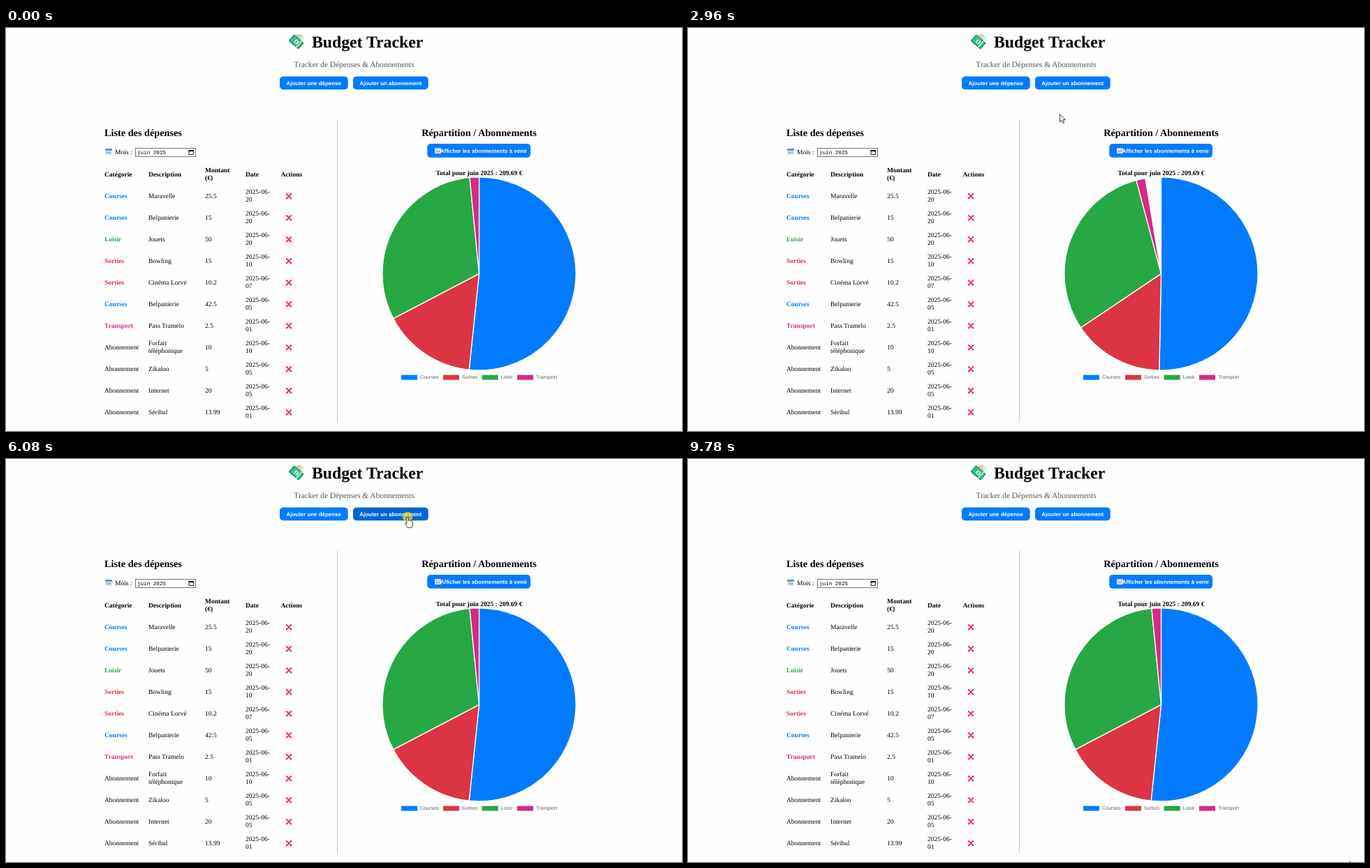
These frames come from a looping animation (968x578 px, 9.85 s). An HTML page:

```html
<!DOCTYPE html>
<html lang="fr">
<head>
<meta charset="utf-8">
<title>Budget Tracker</title>
<style>
  html, body { margin: 0; width: 100%; height: 100%; overflow: hidden; background: #fefefe; }
  svg { display: block; }
  text { font: 9.5px "Liberation Serif", "Times New Roman", serif; text-rendering: geometricPrecision; white-space: pre; }
  .bold { font-weight: bold; }
  .h1 { font-size: 23.75px; font-weight: bold; }
  .h2 { font-size: 14.25px; font-weight: bold; }
  .sub { font-size: 11.4px; fill: #555; }
  .mid { text-anchor: middle; }
  .btn { font: bold 7.92px "Liberation Sans", Arial, sans-serif; fill: #fff; }
  .legend { font: 7.13px "Liberation Sans", Arial, sans-serif; fill: #666; }
  .hint { font: 8.3px "Liberation Sans", Arial, sans-serif; fill: #757575; }
  .mono { font: 7.6px "Liberation Mono", monospace; }
  .date { font-size: 8.1px; }
  .box { fill: #fff; stroke: #ccc; stroke-width: .8; }
  .modal { filter: drop-shadow(0 3px 8px rgba(0, 0, 0, .35)); }
</style>
</head>
<body>
<svg id="stage" width="968" height="578" viewBox="0 0 968 578"></svg>
<script>
const LOOP = 9850;
const BLUE = '#007bff', RED = '#dc3545', GREEN = '#28a745', PINK = '#d62a85';
const HOVER = '#0066d6';

const text = (x, y, s, cls = '', fill = '') =>
  `<text x="${x}" y="${y}" class="${cls}"${fill && ` fill="${fill}"`}>${s.replace('&', '&amp;')}</text>`;
const rect = (x, y, w, h, attrs = '') =>
  `<rect x="${x}" y="${y}" width="${w}" height="${h}" ${attrs}/>`;
const group = (id, body, attrs = '') => `<g id="${id}" ${attrs}>${body}</g>`;

// Page buttons: [id, x, y, width, height, label, label centre]
const buttons = [
  ['expense', 392, 69.5, 97.7, 18.7, 'Ajouter une dépense', 440.7],
  ['subscribe', 497, 69.5, 107.7, 18.7, 'Ajouter un abonnement', 550.7],
  ['upcoming', 603.2, 166, 147.8, 19.8, 'Afficher les abonnements à venir', 684]
];
const button = ([id, x, y, w, h, label, cx]) =>
  rect(x, y, w, h, `id="${id}" rx="4.75" fill="${BLUE}"`) +
  text(cx, y + h / 2 + 2.8, label, 'btn mid');

const picker = (x, y) =>
  `<path d="M${x} ${y + 1}h6.4v6h-6.4z" fill="none" stroke="#111" stroke-width=".9"/>` +
  rect(x - .4, y + .4, 7.2, 2.2, 'fill="#111"');

const calendar = (x, y, w, top) =>
  rect(x, y, w, w * .9, 'rx="1" fill="#e4e9f0"') +
  rect(x, y, w, w * .28, `rx=".8" fill="${top}"`) +
  [0, 1, 2].map(i => rect(x + w * (.18 + i * .24), y + w * .42, w * .14, w * .3, 'fill="#8a9bb0"')).join('');

const banknote = `<g transform="translate(416 19.5)">
  <path d="M-3-9 5-11 10-7 7-1z" fill="#d9c9a3"/>
  <path d="M-11 1-6-5-1 1-6 6z" fill="#cfd8d2"/>
  <g transform="rotate(42)">
    <rect x="-9.5" y="-5.5" width="19" height="12" rx="1" fill="#149a67"/>
    <rect x="-8" y="-4.2" width="16" height="9.2" fill="#36c08a"/>
    <circle r="3.2" cy=".4" fill="#e6f6ee"/>
    <path d="M0-2V3" stroke="#149a67" stroke-width="1.2"/>
    <path d="M5-5.5v12" stroke="#d3efdf" stroke-width="1.6"/>
  </g>
  <path d="M4-9 11-5 10 0z" fill="#e9edf0"/>
</g>`;

// Expense rows: category, description, amount, day of June
const rows = [
  ['Courses', 'Maravelle', '25.5', '20'],
  ['Courses', 'Belpanierie', '15', '20'],
  ['Loisir', 'Jouets', '50', '20'],
  ['Sorties', 'Bowling', '15', '10'],
  ['Sorties', 'Cinéma Lorvé', '10.2', '07'],
  ['Courses', 'Belpanierie', '42.5', '05'],
  ['Transport', 'Pass Tramelo', '2.5', '01'],
  ['Abonnement', 'Forfait téléphonique', '10', '10'],
  ['Abonnement', 'Zikaloo', '5', '05'],
  ['Abonnement', 'Internet', '20', '05'],
  ['Abonnement', 'Séribul', '13.99', '01']
];
const tint = { Courses: BLUE, Sorties: RED, Loisir: GREEN, Transport: PINK };

const twoLines = (x, y, a, b, cls) => text(x, y - 5.6, a, cls) + text(x, y + 5.2, b, cls);

function row([cat, desc, amount, day], i) {
  const y = 243.7 + 31 * i;
  const [first, second] = desc.split(' ');
  return text(141, y, cat, tint[cat] ? 'bold' : '', tint[cat]) +
    (desc.length > 15 ? twoLines(204, y, first, second) : text(204, y, desc)) +
    text(285, y, amount) +
    twoLines(343, y, '2025-06-', day) +
    `<path d="M401.7 ${y - 5.8}l6.6 6.6m0-6.6l-6.6 6.6" stroke="#ea2a58" stroke-width="2" stroke-linecap="round"/>`;
}

const table =
  text(141, 213, 'Catégorie', 'bold') + text(204, 213, 'Description', 'bold') +
  twoLines(285, 213, 'Montant', '(€)', 'bold') +
  text(343, 213, 'Date', 'bold') + text(393.5, 213, 'Actions', 'bold') +
  rows.map(row).join('');

const slices = [['Courses', 83], ['Sorties', 25.2], ['Loisir', 50], ['Transport', 2.5]];
const legendX = [566, 626, 681.7, 732];
const legend = slices.map(([name], i) =>
  rect(legendX[i], 497.6, 23, 7, `fill="${tint[name]}"`) +
  text(legendX[i] + 27, 503.4, name, 'legend')).join('');

const chart =
  text(677.5, 211, 'Total pour juin 2025 : 209.69 €', 'bold mid') +
  group('pie', slices.map(([name]) => `<path fill="${tint[name]}"/>`).join(''),
    'stroke="#fff" stroke-width="1.3" stroke-linejoin="bevel"') + legend;

const upcoming = text(677.5, 214, 'Abonnements à venir', 'bold mid') +
  rows.slice(7).map(([, name, amount, day], i) => {
    const y = 228 + i * 83;
    return rect(524.5, y, 306, 76, 'rx="4" fill="#fafafa" stroke="#ddd" stroke-width=".8"') +
      text(677.5, y + 24, name, 'bold mid') + text(677.5, y + 42, amount + ' €', 'mid') +
      text(677.5, y + 60, '2025-07-' + day, 'mid');
  }).join('');

function modal(id, title, labels, hint) {
  const fields = labels.map((label, i) => {
    const y = 298.8 + 40.6 * i;
    return text(498.5, y - 4.8, label, 'mid') +
      rect(379.4, y, 249, i === 3 ? 21.2 : 19.6, 'rx="3" class="box"');
  }).join('');
  return group(id,
    rect(0, 0, 968, 578, 'fill="#000" opacity=".4"') +
    rect(362, 228, 273.5, 266.7, 'rx="7" fill="#fff" class="modal"') +
    text(624, 243.3, '×', 'mid') +
    text(498.5, 270.4, title, 'h2 mid') + fields +
    (hint ? text(384, 393, hint, 'hint') : '') +
    text(385, 434, 'jj/mm/aaaa', 'mono date') + picker(614.6, 426.8) +
    rect(474.8, 456.7, 47, 20.5, 'rx="4.75" fill="#ccc"') +
    text(498.3, 469.8, 'Ajouter', 'btn mid'));
}

const cursor = group('cursor',
  `<path id="arrow" d="M0 0V11L2.6 8.7 4.5 12.8 6.3 12 4.5 8H8z"/>
   <path id="hand" d="M-1.2 1Q0-.8 1.2 1V5.4L2.2 4.8 3.6 5.6 4.6 5.3 5.6 6.3 6.8 6.4 7.4 7.6V11Q7.2 13 5.8 15.4H-.2Q-1.4 12.6-3.6 10.2-4.2 8.6-2.6 8.6L-1.2 9.8z"/>`,
  'fill="#fff" stroke="#111" stroke-width=".8" stroke-linejoin="round"');

const $ = id => document.getElementById(id);

$('stage').innerHTML =
  rect(0, 0, 968, 578, 'fill="#fefefe"') + banknote +
  text(517.6, 28, 'Budget Tracker', 'h1 mid') +
  text(498.5, 55.5, 'Tracker de Dépenses & Abonnements', 'sub mid') +
  buttons.map(button).join('') + calendar(614, 172, 9, '#c3d3e6') +
  rect(474, 131, 1, 435, 'fill="#ccc"') +
  text(141, 155.4, 'Liste des dépenses', 'h2') +
  text(677.5, 155.4, 'Répartition / Abonnements', 'h2 mid') +
  calendar(142, 173, 10, '#4d8fd6') + text(156, 181, 'Mois :') +
  rect(185.5, 172.5, 86, 12, 'fill="#fff" stroke="#767676"') +
  text(188, 181, 'juin 2025', 'mono') + picker(262, 174.5) +
  table + group('chart', chart) + group('list', upcoming) +
  modal('expenseForm', 'Ajouter une dépense', ['Catégorie :', 'Description :', 'Montant (€) :', 'Date :']) +
  modal('subForm', 'Ajouter un abonnement', ['Nom', 'Montant (€)', 'Fréquence', 'Date de début'], 'ex: Mensuel') +
  '<circle id="click" r="7.2" fill="#ffe600" opacity=".65"/>' + cursor;

// Pointer moves: start, end, x, y
const moves = [
  [0, 640, 702, 138], [640, 870, 672, 170],
  [2480, 3380, 419, 86], [3440, 3510, 418, 87],
  [3910, 4600, 624.5, 238], [5280, 5820, 575, 83],
  [6150, 6830, 622, 238], [7770, 8180, 948, 600], [9779, 9780, 948, 577]
];
const clicks = [[1140, 1210], [2270, 2410], [3840, 3910], [5070, 5210], [6080, 6150], [7370, 7570]];

const within = (t, a, b) => t >= a && t < b;
const show = (id, on) => $(id).setAttribute('visibility', on ? 'visible' : 'hidden');

function pointer(t) {
  let x = 930, y = 600;
  for (const [a, b, tx, ty] of moves) {
    const p = Math.min(1, Math.max(0, (t - a) / (b - a)));
    const e = p * p * (3 - 2 * p);
    x += (tx - x) * e;
    y += (ty - y) * e;
  }
  return [x, y];
}

function drawPie(k) {
  const cx = 677.5, cy = 352.4, r = 138.6;
  const total = slices.reduce((sum, s) => sum + s[1], 0);
  const at = a => `${cx + r * Math.sin(a)} ${cy - r * Math.cos(a)}`;
  let from = 0;
  slices.forEach(([, value], i) => {
    const sweep = value / total * 2 * Math.PI * k;
    const large = sweep > Math.PI ? 1 : 0;
    $('pie').children[i].setAttribute('d',
      `M${cx} ${cy}L${at(from)}A${r} ${r} 0 ${large} 1 ${at(from + sweep)}Z`);
    from += sweep;
  });
}

function render(t) {
  const [x, y] = pointer(t);
  const first = within(t, 3910, 5280), second = within(t, 6150, 7570);
  const listed = within(t, 1210, 2410);
  let over = false;
  for (const [id, bx, by, w, h] of buttons) {
    const hit = !first && !second && within(x, bx, bx + w) && within(y, by, by + h);
    $(id).setAttribute('fill', hit ? HOVER : BLUE);
    over = over || hit;
  }
  const hand = over || within(t, 6970, 7570);
  show('hand', hand);
  show('arrow', !hand);
  show('chart', !listed);
  show('list', listed);
  show('expenseForm', first);
  show('subForm', second);
  show('click', clicks.some(([a, b]) => within(t, a, b)));
  for (const id of ['cursor', 'click']) $(id).setAttribute('transform', `translate(${x} ${y})`);

  // The chart sweeps open over one second, easing out by the fourth power.
  const p = within(t, 2363, 3363) ? (t - 2363) / 1000 : 1;
  drawPie(1 - (1 - p) ** 4);
}

const start = performance.now();
function tick() {
  render((performance.now() - start) % LOOP);
  requestAnimationFrame(tick);
}
tick();
</script>
</body>
</html>
```
